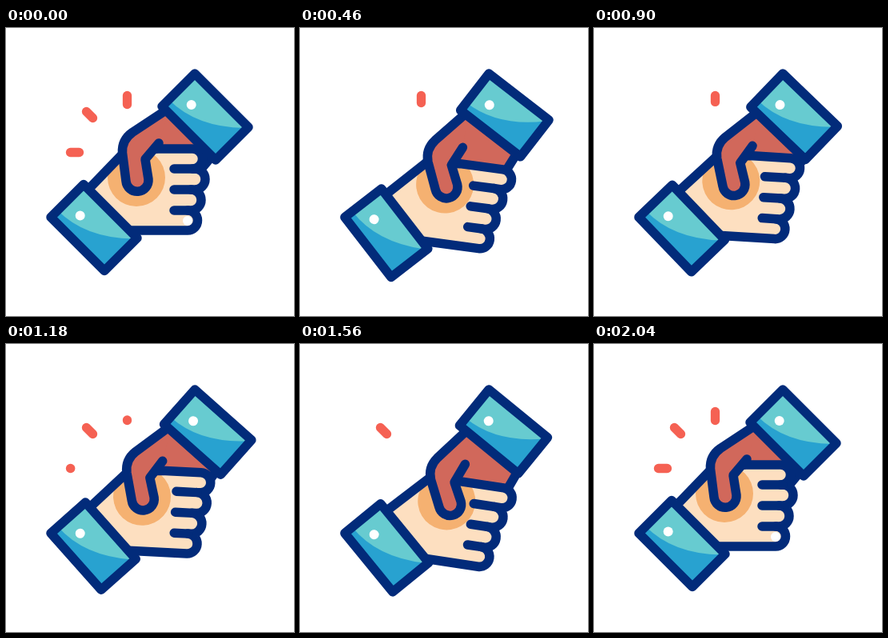
Animation, 360 px wide and 360 px high, one loop 2.22 s. Source, as an HTML page:

```html
<!DOCTYPE html>
<html lang="en">
<head>
<meta charset="utf-8">
<title>Handshake</title>
<style>
  html, body { margin: 0; height: 100%; overflow: hidden; background: #fff; }
  svg { display: block; width: 100vw; height: 100vh; }
  .ink { fill: none; stroke: #022b7a; stroke-width: 11.5; stroke-linecap: round; stroke-linejoin: round; }
  .red { fill: #d1685b; }
  .spark { stroke: #f56153; stroke-width: 11.3; stroke-linecap: round; }
</style>
</head>
<body>
<svg viewBox="0 0 360 360">
  <defs>
    <path id="hand"/>
    <path id="thumb" d="M205 99.5L158 130.5Q144.5 140 145.5 156L150 191.5A14 14 0 0 0 178 189L174 164L191 144"/>
    <path id="band" d="M236 57L303 124L262 165L195 98Z"/>
    <clipPath id="handClip"><use href="#hand"/></clipPath>
    <g id="cuff">
      <use href="#band" fill="#28a2d0"/>
      <path d="M236 57L303 124L298 125Q238 124 204 90Z" fill="#67cbd0"/>
      <use href="#band" class="ink"/>
      <circle cx="231.7" cy="96" r="6" fill="#fff"/>
    </g>
  </defs>

  <g id="sparks"></g>

  <g class="redArm">
    <path class="red" d="M205 101L260 157L240 181L176 170Z"/>
    <path class="ink" d="M260 157L240 181"/>
  </g>

  <g id="paleArm">
    <use href="#hand" fill="#fddfc0"/>
    <g clip-path="url(#handClip)">
      <circle id="shade" cx="163" cy="187" r="36" fill="#f5b171"/>
      <circle id="glint" cx="227" cy="241" r="6" fill="#fff"/>
    </g>
    <use href="#hand" class="ink"/>
    <path class="ink" d="M210 176H236M210 202H232M210 228H228"/>
  </g>

  <g class="redArm">
    <use href="#thumb" class="red"/>
    <use href="#thumb" class="ink"/>
  </g>

  <g id="cuffLeft"><use href="#cuff" x="-139" y="138.5"/></g>
  <g id="cuffRight"><use href="#cuff"/></g>
</svg>
<script>
const LOOP = 2220, REST = 2040, SHAKE = 820;
const $ = id => document.getElementById(id);
const redParts = document.querySelectorAll('.redArm');
const clamp = x => Math.min(1, Math.max(0, x));
const smooth = x => (1 - Math.cos(Math.PI * clamp(x))) / 2;

// Rise to the first peak, swing between high and low, then settle at zero
function swing(t, begin, peak, low, high) {
  const end = peak + 1.5 * SHAKE;
  if (t < peak) return high * smooth((t - begin) / (peak - begin));
  if (t > end) return low * (1 - smooth((t - end) / (REST - end)));
  return low + (high - low) * (1 + Math.cos(2 * Math.PI * (t - peak) / SHAKE)) / 2;
}

// Each spark shrinks away from its start, then grows back, three times
const SHRINK = 98, GROW = 40, ROUNDS = 3;
const sparks = [
  { x: 80.5, y: 155.5, dx: 11, dy: 0, first: 295, period: 505 },
  { x: 100.5, y: 104.5, dx: 8, dy: 8, first: 350, period: 430 },
  { x: 151.5, y: 95.5, dx: 0, dy: -11, first: 444, period: 430 }
];
for (const s of sparks) {
  s.line = document.createElementNS('http://www.w3.org/2000/svg', 'line');
  s.line.setAttribute('class', 'spark');
  $('sparks').append(s.line);
}

function drawSpark({ x, y, dx, dy, first, period, line }, t) {
  const round = Math.floor((t - first) / period);
  const active = round >= 0 && round < ROUNDS;
  const age = t - first - round * period, back = period - 125;
  const growing = active && age >= back;
  const from = active && !growing ? age / SHRINK : 0;
  const to = growing ? clamp((age - back) / GROW) : 1;
  line.style.display = from > 1 ? 'none' : '';
  [from, to].forEach((k, i) => {
    line.setAttribute('x' + (i + 1), x + dx * k);
    line.setAttribute('y' + (i + 1), y + dy * k);
  });
}

const turn = (el, value) => el.setAttribute('transform', value);
const aboutLeft = a => `rotate(${a} 56 236)`;
const aboutRight = a => `rotate(${-a} 236 56)`;

function draw(t) {
  const cuff = swing(t, 0, 590, 0, 8.2);
  const hand = swing(t, 60, 640, 1, 9.8);  // lags behind the cuffs
  const red = hand + 0.4 * Math.max(0, hand - cuff);
  const reach = 233 + 11 * clamp(hand / 5);

  $('hand').setAttribute('d', `M94 211L149 154L190 151H${reach}a12.5 12.5 0 0 1 0 25H236
    a13 13 0 0 1 0 26H231a13 13 0 0 1 0 26H227a12.5 12.5 0 0 1 0 25H140Z`);
  turn($('cuffLeft'), aboutLeft(cuff));
  turn($('cuffRight'), aboutRight(cuff));
  turn($('paleArm'), aboutLeft(hand));
  turn($('shade'), aboutLeft(-hand) + aboutRight(hand));
  redParts.forEach(p => turn(p, aboutRight(red)));
  $('glint').style.display = t < 200 || t > 1640 ? '' : 'none';
  sparks.forEach(s => drawSpark(s, t));
}

const start = performance.now();
function tick() {
  draw(Math.min(REST, (performance.now() - start) % LOOP));
  requestAnimationFrame(tick);
}
tick();
</script>
</body>
</html>
```
